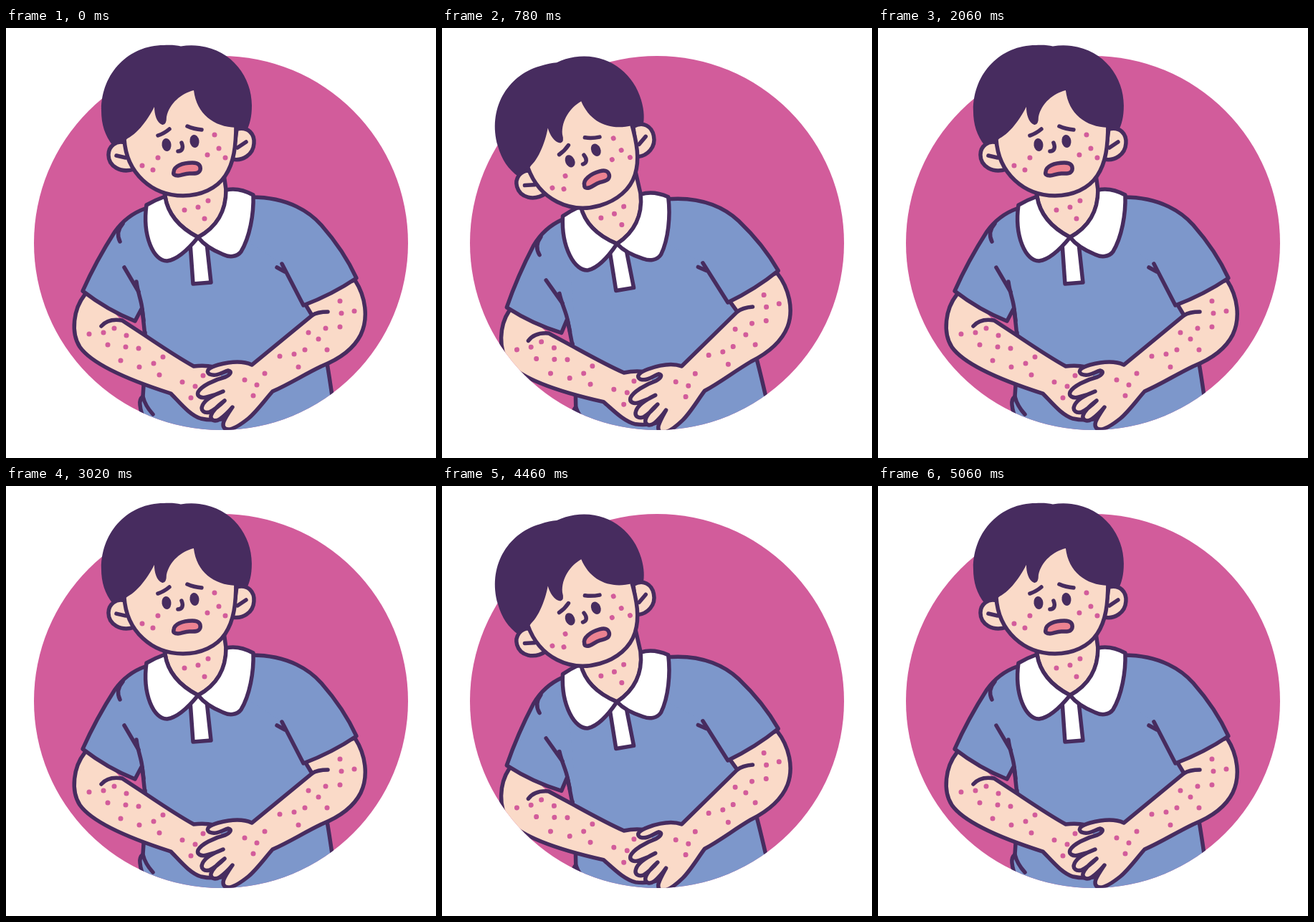
Animation, 600 px wide and 600 px high, one loop 6000 ms. Source, as an HTML page with a canvas:

```html
<!DOCTYPE html>
<html lang="en">
<head>
<meta charset="utf-8">
<title>Boy with a rash</title>
<style>
html, body { margin: 0; width: 100%; height: 100%; overflow: hidden; background: #fff; }
canvas { display: block; width: 600px; height: 600px; }
</style>
</head>
<body>
<canvas id="stage"></canvas>
<script>
const canvas = document.getElementById('stage');
const ctx = canvas.getContext('2d');
const dpr = window.devicePixelRatio || 1;
canvas.width = canvas.height = 600 * dpr;

const PINK = '#d25c9b', INK = '#472c5f', SKIN = '#fadac8', BLUE = '#7d97cb', LIP = '#ec8291';
const CYCLE = 3000;
const DEG = Math.PI / 180;

const disc = new Path2D();
disc.arc(300, 300, 261, 0, Math.PI * 2);

const shape = (d, fill, stroke) => ({ path: new Path2D(d), fill, stroke });
const line = d => shape(d, null, INK);

const body = [
  // torso
  shape('M196 250L345 236L385 329L415 387L428 401L440 440L450 476L460 540L470 600H200L190 545Q185 532 187 524Q187 518 191 514L193 430L189 390L182 354L160 300Z', BLUE),
  line('M194 425L192 499L191 514Q186 518 187 526Q188 536 193 547'),
  line('M190 392L194 430'),
  line('M191 514Q194 527 205 539'),
  line('M448 468Q451 485 456 520'),
  // left arm
  shape('M110 372C94 392 90 425 103 445C122 472 180 494 230 510C242 522 256 540 272 545Q285 548 300 546L300 475Q280 469 262 472C240 460 215 443 194 429L160 407L140 385Z', SKIN),
  line('M110 372C94 392 90 425 103 445C122 472 180 494 230 510C242 522 256 540 272 545Q285 548 300 546'),
  line('M290 473Q277 470 262 472C240 460 215 443 194 429L162 408C150 406 140 408 133 416'),
  // left sleeve
  shape('M200 250L194 252C180 257 165 266 152 284C134 312 119 340 107 367Q142 394 180 409L190 391L200 380Z', BLUE),
  line('M194 252C180 257 165 266 152 284C134 312 119 340 107 367Q142 394 180 409L189 392'),
  line('M182 354C184 370 189 380 190 392L192 408'),
  line('M165 334L185 368'),
  line('M163 273C156 281 155 290 159 298'),
  // right arm and hand
  shape('M487 352C502 375 506 405 495 428C485 448 465 462 440 472C415 484 395 497 372 507C362 518 350 535 338 545C328 553 318 560 310 560C303 560 302 554 304 549C307 542 312 535 316 529C311 535 305 541 298 546C291 550 285 547 286 541C288 534 297 526 305 520C299 526 292 532 284 536C277 538 271 534 274 527C277 519 290 512 303 507C297 510 289 513 280 515C272 517 266 514 268 508C272 500 290 491 306 487C313 484 316 479 310 478C302 480 294 487 284 483C277 478 285 473 296 470C315 465 330 464 343 470L427 401L418 386L450 360Z', SKIN, INK),
  line('M427 401C433 397 440 396 449 396'),
  // right sleeve
  shape('M340 236C395 236 425 258 440 275C462 300 478 325 489 349Q455 372 415 387L385 329L340 300Z', BLUE),
  line('M343 236C395 236 425 258 440 275C462 300 478 325 489 349Q455 372 415 387L385 329'),
  line('M378 334L389 340'),
  // neck, placket, collar
  shape('M215 205L302 190L307 226C308 260 290 280 268 292C245 280 226 262 222 235Z', SKIN, INK),
  shape('M257 300L261 357L286 355L280 300L268 292Z', '#fff', INK),
  shape('M196 247Q208 240 222 235C226 262 245 280 268 292C255 308 240 323 225 325C206 326 190 290 196 247Z', '#fff', INK),
  shape('M307 226Q325 222 345 233C346 260 340 292 328 312C322 320 311 320 303 316C288 310 275 301 268 292C290 280 307 260 307 226Z', '#fff', INK)
];

const head = [
  shape('M166 160C154 156 143 165 143 177C143 193 160 203 179 197Z', SKIN, INK),
  line('M154 178L167 181'),
  shape('M322 141C338 137 347 148 346 161C345 177 330 186 316 183Z', SKIN, INK),
  line('M323 167L335 159'),
  shape('M165 155C168 203 204 234 247 234C272 234 294 224 306 206C318 188 321 165 321 134L262 80L207 105Z', SKIN, INK),
  shape('M149 164C138 150 133 135 133 115C133 62 172 24 220 24C230 23.5 238 24 244 25.5C253 24 262 24 270 25C316 31 343 69 343 108C343 125 340 134 336 143L321 139C290 138 266 120 262 87C245 91 228 105 224 124Q224 136 218 135C210 132 207 120 207 110C197 130 180 152 163 157Q155 158 149 164Z', INK),
  line('M212 150Q221 147 228 141'),
  line('M253 137Q262 141 273 142'),
  line('M245 160C248 167 246 172 240 172'),
  shape('M234 201C234 193 246 188 260 188C270 188 272 193 271 198C269 204 262 203 256 203C249 203 245 206 240 206C235 206 233 204 234 201Z', LIP, INK)
];

const eyes = [[224, 163], [263, 158]];
const faceDots = [[291, 149], [297, 168], [306, 181], [281, 177], [212, 181], [190, 192], [205, 198]];
const neckDots = [[249, 254], [268, 250], [282, 241], [277, 266]];
const rightDots = [
  [466, 381], [486, 395], [468, 398], [466, 417], [446, 419], [422, 425], [436, 434], [448, 449],
  [417, 449], [402, 455], [382, 458], [408, 473], [333, 491], [361, 482], [350, 498], [345, 513]
];
const leftDots = [
  [116, 427], [136, 425], [151, 419], [168, 429], [142, 442], [167, 445], [185, 447], [160, 464],
  [186, 473], [206, 468], [219, 459], [214, 484], [246, 494], [264, 500], [275, 485], [258, 516]
];

function ease(t, from, to) {
  const k = Math.min(1, Math.max(0, (t - from) / (to - from)));
  return k * k * (3 - 2 * k);
}

function turn(x, y, degrees) {
  ctx.translate(x, y);
  ctx.rotate(degrees * DEG);
  ctx.translate(-x, -y);
}

function drawShapes(list) {
  for (const { path, fill, stroke } of list) {
    if (fill) { ctx.fillStyle = fill; ctx.fill(path); }
    if (stroke) { ctx.strokeStyle = stroke; ctx.stroke(path); }
  }
}

function drawDots(list) {
  ctx.fillStyle = PINK;
  for (const [x, y] of list) {
    ctx.beginPath();
    ctx.arc(x, y, 3.5, 0, Math.PI * 2);
    ctx.fill();
  }
}

function drawEyes() {
  ctx.fillStyle = INK;
  for (const [x, y] of eyes) {
    ctx.beginPath();
    ctx.ellipse(x, y, 6.5, 9, -8 * DEG, 0, Math.PI * 2);
    ctx.fill();
  }
}

function draw(t) {
  // the head leads, the body follows
  const nod = ease(t, 0, 600) - ease(t, 1440, 2030);
  const lean = ease(t, 230, 790) - ease(t, 1520, 2075);

  ctx.setTransform(dpr, 0, 0, dpr, 0, 0);
  ctx.fillStyle = '#fff';
  ctx.fillRect(0, 0, 600, 600);
  ctx.fillStyle = PINK;
  ctx.fill(disc);
  ctx.lineWidth = 5.5;
  ctx.lineCap = ctx.lineJoin = 'round';

  ctx.save();
  ctx.clip(disc);
  turn(361, 570, -5 * lean);
  drawShapes(body);
  [neckDots, leftDots, rightDots].forEach(drawDots);
  ctx.restore();

  ctx.save();
  turn(361, 570, -5 * lean);
  turn(262, 225.4, -11 * nod);
  drawShapes(head);
  drawEyes();
  drawDots(faceDots);
  ctx.restore();
}

const start = performance.now();
function tick() {
  draw((performance.now() - start) % CYCLE);
  requestAnimationFrame(tick);
}
tick();
</script>
</body>
</html>
```
